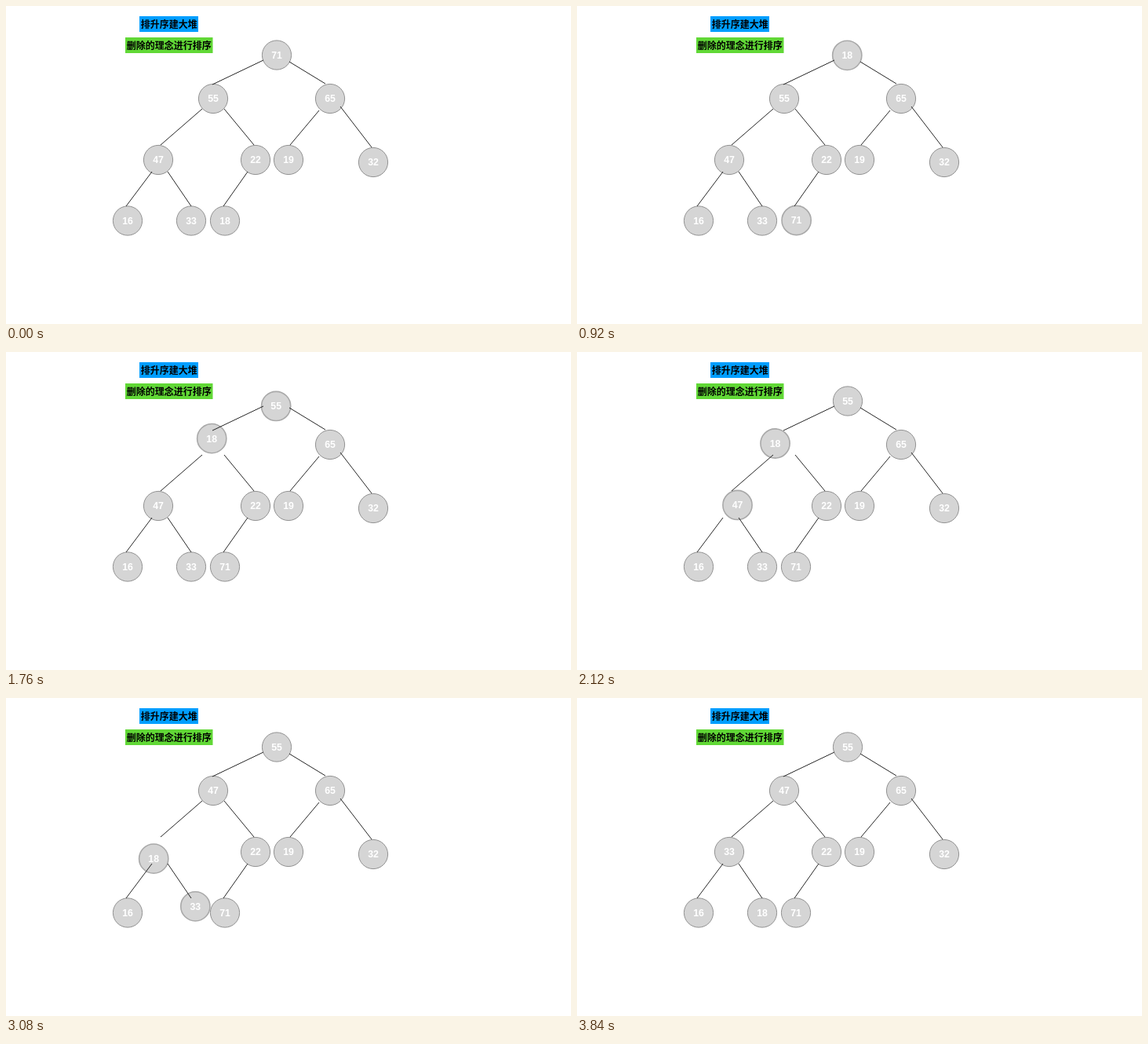
An HTML page for the animation above (4360 ms loop, 720x405 px).

```html
<!DOCTYPE html>
<html lang="zh">
<head>
<meta charset="utf-8">
<style>
  html, body { margin: 0; width: 100%; height: 100%; overflow: hidden; background: #fff; }
  svg { display: block; width: 720px; height: 405px; }
  text { text-anchor: middle; font-weight: bold; font-size: 12px; }
  circle { fill: #d5d5d5; stroke: #929292; }
  .moving circle { stroke: #a9a9a9; stroke-width: 1.6; }
  #nodes text { fill: #fff; font-family: "Liberation Sans", Arial, sans-serif; font-size: 12.3px; }
  #labels text { font-family: "Noto Sans CJK SC", "Noto Sans CJK", sans-serif; }
  path { stroke: #262626; fill: none; }
</style>
</head>
<body>
<svg viewBox="0 0 720 405">
  <g id="nodes"></g>
  <path d="M328 69L263 100M361 71L407 99M250 131L197 177M278 131L316 177M399 133L362 177
           M426 128L466 180M186 211L153 255M206 211L236 255M308 211L277 255"/>
  <g id="labels">
    <rect x="170" y="13" width="75" height="20" fill="#009eff"/>
    <text x="207.8" y="27.5">排升序建大堆</text>
    <rect x="152" y="40" width="111.5" height="20" fill="#61d836"/>
    <text x="207.8" y="54.5">删除的理念进行排序</text>
  </g>
</svg>
<script>
const LOOP = 4360, STEP = 40, SWAP = 960;

// Heap slots in array order, with the value each one holds at the start.
const slots = [[345, 62.5], [264, 118], [413, 118], [194, 196], [318, 196],
               [360, 196], [468, 199], [155, 273.5], [236, 273.5], [279, 273.5]];
const values = [71, 55, 65, 47, 22, 19, 32, 16, 33, 18];

// Per value: swap index, from slot, to slot, handle along the chord, bend to the left of travel.
const moves = {
  71: [[0, 0, 9, .297, .201]],
  55: [[1, 1, 0, .25, -.31]],
  47: [[2, 3, 1, .26, -.28]],
  33: [[3, 8, 3, .15, -.4]],
  18: [[0, 9, 0, .246, .277], [1, 0, 1, .15, -.48], [2, 1, 3, .2, -.375], [3, 3, 8, .163, -.43]]
};

const bezier = (t, a, b, c, d) => {
  const u = 1 - t;
  return u * u * u * a + 3 * u * u * t * b + 3 * u * t * t * c + t * t * t * d;
};

function easeInOut(p) {
  let lo = 0, hi = 1;
  for (let i = 0; i < 24; i++) {
    const mid = (lo + hi) / 2;
    if (bezier(mid, 0, .42, .58, 1) < p) lo = mid; else hi = mid;
  }
  return bezier(lo, 0, 0, 1, 1);
}

function along([x0, y0], [x1, y1], handle, bend, t) {
  const dx = x1 - x0, dy = y1 - y0;
  const u = bezier(t, 0, handle, 1 - handle, 1);
  const n = bezier(t, 0, bend, bend, 0);
  return [x0 + dx * u + dy * n, y0 + dy * u - dx * n];
}

const group = document.getElementById("nodes");
group.innerHTML = values.map(v => `<g><circle r="18.6"/><text y="4.4">${v}</text></g>`).join("");

function draw(time) {
  values.forEach((value, i) => {
    let pos = slots[i], moving = false;
    for (const [swap, from, to, handle, bend] of moves[value] || []) {
      const p = time / SWAP - swap;
      if (p <= 0) break;
      moving = p < 1;
      pos = moving ? along(slots[from], slots[to], handle, bend, easeInOut(p)) : slots[to];
    }
    const node = group.children[i];
    node.setAttribute("transform", `translate(${pos})`);
    node.setAttribute("class", moving ? "moving" : "");
  });
}

const start = performance.now();
function tick() {
  const time = (performance.now() - start) % LOOP;
  draw(Math.floor(time / STEP) * STEP);
  requestAnimationFrame(tick);
}
tick();
</script>
</body>
</html>
```
